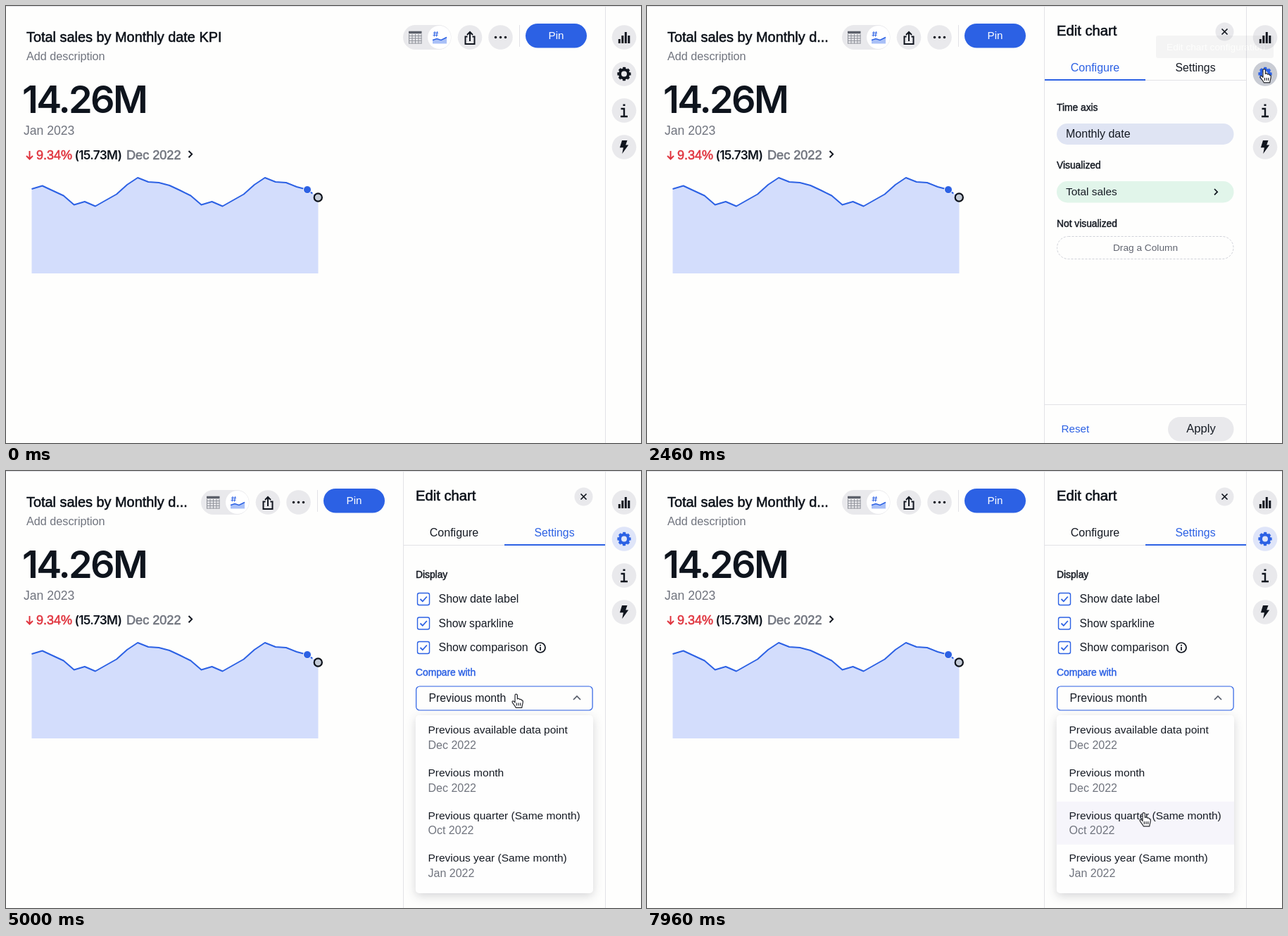
These frames come from a looping animation (902 by 621 pixels, 8000 ms). An HTML page:

```html
<!DOCTYPE html>
<html lang="en">
<head>
<meta charset="utf-8">
<title>KPI chart settings</title>
<style>
  html, body { margin: 0; width: 100%; height: 100%; overflow: hidden; background: #fefefd; }
  svg { display: block; width: 100vw; height: 100vh; }
  text { font-family: "Liberation Sans", Arial, sans-serif; font-size: 16px; fill: #151a23; }
  .mid { text-anchor: middle; }
  .med { stroke: currentColor; stroke-width: .55px; color: #0b1018; fill: currentColor; }
  .head { font-size: 13.8px; stroke: currentColor; stroke-width: .45px; color: #151a23; fill: currentColor; }
  .semi { font-family: Inter, "Liberation Sans", sans-serif; font-weight: 600; fill: #0e141d; }
  .grey { fill: #70747e; }
  .opt { font-size: 15.5px; }
  .btn { fill: #e9e9ec; }
  .line { stroke: #e2e2e6; fill: none; }
  .ink { fill: none; stroke: #10151e; stroke-width: 2; }
  .thin { stroke-width: 1.7; }
  .box { fill: #fefefd; stroke: #bcc0cb; stroke-width: 1.2; }
  .chev { fill: none; stroke: #555b68; stroke-width: 1.7; }
  .blue { fill: #2c61e4; }
  .check { fill: none; stroke: #2c61e4; stroke-width: 1.4; }
</style>
</head>
<body>
<svg viewBox="0 0 902 621" preserveAspectRatio="none">
  <defs>
    <g id="tick" class="check">
      <rect x="584.5" y="173.5" width="17" height="17" rx="2.5"/>
      <path d="M588.5 182l3.3 3.3 6-6.8" stroke-width="1.8"/>
    </g>
    <g id="swatch">
      <rect class="box" x="582.6" y="384" width="66" height="34" rx="5"/>
      <rect x="593" y="393" width="15.5" height="16" rx="3"/>
      <path class="chev" d="M622 398.5l5 5 5-5"/>
    </g>
  </defs>
  <rect width="902" height="621" fill="#fefefd"/>

  <!-- KPI card -->
  <text id="title" class="med" x="29" y="50.5" style="font-size:19.9px"></text>
  <text class="grey" x="29" y="77" style="font-size:16.2px">Add description</text>
  <text class="semi" x="23" y="152" style="font-size:54px;letter-spacing:-.05em">14.26M</text>
  <text class="grey" x="25" y="183" style="font-size:17.6px">Jan 2023</text>
  <path d="M33.5 206v11M29 213l4.5 4.5 4.5-4.5" fill="none" stroke="#e0353f" stroke-width="2"/>
  <text class="med" x="43" y="218" style="font-size:18px;color:#e0353f">9.34%</text>
  <text class="semi" x="97.5" y="218" style="font-size:17.3px;letter-spacing:-.04em">(15.73M)</text>
  <text class="med" x="171" y="218" style="font-size:18.1px;color:#70747e">Dec 2022</text>
  <path class="ink" d="M259.5 206l4.6 4.6-4.6 4.6"/>
  <path id="area" fill="#d3ddfc"/>
  <path id="spark" fill="none" stroke="#2c61e4" stroke-width="2" stroke-linejoin="round"/>
  <path d="M428 261l15 11" stroke="#2c61e4" stroke-width="2" stroke-dasharray="3 3"/>
  <circle class="blue" cx="428" cy="261" r="5.5" stroke="#fff"/>
  <circle cx="443.3" cy="272" r="5.6" fill="#c3cad6" stroke="#0c1119" stroke-width="2.2"/>

  <!-- Toolbar -->
  <g id="bar">
    <rect class="btn" x="564" y="27" width="68.5" height="35" rx="17.5"/>
    <circle cx="615.5" cy="44.5" r="16.5" fill="#fff"/>
    <path d="M572 37.5h18.5" stroke="#5d616b" stroke-width="3.5"/>
    <path d="M572 42.5h18.500m-18.5 3.500h18.500m-18.5 3.500h18.500m-18.5 3.500h18.500M572.5 40v13.500m4.500-13.500v13.500m4.500-13.500v13.500m4.500-13.500v13.500m4-13.500v13.500" fill="none" stroke="#8f929a"/>
    <path d="M609.2 36l-1 7.500m4.300-7.500l-1 7.500m-4.500-5.200h7m-7.500 3h7" fill="none" stroke="#2c61e4"/>
    <path d="M606 48.5l6-2 6 2 8-4v9h-20z" fill="#a9c0f7"/>
    <path d="M606 48.5l6-2 6 2 8-4" fill="none" stroke="#2c61e4" stroke-width="1.5"/>
    <circle class="btn" cx="659" cy="44.500" r="17.300"/>
    <path class="ink" d="M655.5 43.5h-3v10.500h13v-10.500h-3M659 50V37m-4 4l4-4 4 4"/>
    <circle class="btn" cx="702.5" cy="44.5" r="17.3"/>
    <path d="M695.5 44.5h0m7 0h0m7 0h0" stroke="#10151e" stroke-width="3.6" stroke-linecap="round"/>
    <path class="line" d="M729.5 27v31"/>
    <rect id="pin" x="738" y="25" width="87" height="34.5" rx="17.25"/>
    <text class="mid" x="781.5" y="46.5" style="font-size:15.2px;fill:#fff">Pin</text>
  </g>

  <!-- Side panel -->
  <g id="panel">
    <rect x="564" width="290" height="621" fill="#fefefd"/>
    <path class="line" d="M564.5 1v620M565 105.5h286"/>
    <text class="med" x="582" y="42" style="font-size:20.2px">Edit chart</text>
    <circle class="btn" cx="820.5" cy="36.5" r="13"/>
    <path class="ink thin" d="M816.5 32.5l8 8m0-8l-8 8"/>
    <text id="tabA" class="mid" x="636.5" y="93">Configure</text>
    <text id="tabB" class="mid" x="779" y="93" style="font-size:15.8px">Settings</text>
    <rect id="under" class="blue" y="104" width="143" height="2"/>

    <g id="configure">
      <text class="head" x="582" y="148.5">Time axis</text>
      <rect x="582" y="167" width="251.5" height="30" rx="15" fill="#dfe4f3"/>
      <text x="595" y="187">Monthly date</text>
      <text class="head" x="582" y="231">Visualized</text>
      <rect x="582" y="249" width="251.5" height="30.5" rx="15" fill="#e1f5ea"/>
      <text x="595" y="269" style="font-size:15.4px">Total sales</text>
      <path class="ink thin" d="M806 260l4.2 4.2-4.2 4.2"/>
      <text class="head" x="582" y="313.5">Not visualized</text>
      <rect x="582.5" y="327.5" width="250.5" height="32" rx="16" fill="none" stroke="#cfd1d8" stroke-dasharray="3 2"/>
      <text class="mid" x="708" y="347.5" style="font-size:13.7px;fill:#60646f">Drag a Column</text>
      <path class="line" d="M565 566.5h286"/>
      <text x="588.5" y="606" style="font-size:15.2px;fill:#2c61e4">Reset</text>
      <rect class="btn" x="740" y="584" width="93.5" height="34.5" rx="17.25"/>
      <text class="mid" x="787" y="606" style="font-size:16.5px">Apply</text>
    </g>

    <g id="settings">
      <text class="head" x="582" y="151.8">Display</text>
      <use href="#tick"/><use href="#tick" y="34.5"/><use href="#tick" y="69"/>
      <text x="614.5" y="187">Show date label</text>
      <text x="614.5" y="221.5" style="font-size:15.7px">Show sparkline</text>
      <text x="614.5" y="256">Show comparison</text>
      <circle class="ink thin" cx="759" cy="251" r="7"/>
      <path class="ink thin" d="M759 246.8v2m0 1.3v5"/>
      <text id="label" class="head" x="582" y="291.3">Compare with</text>
      <rect id="select" class="box" x="582.6" y="306" width="250.5" height="34" rx="5"/>
      <text x="600.5" y="328" style="font-size:15.8px">Previous month</text>
      <path id="chev" class="chev"/>
      <text class="head" x="582" y="369.8">Color</text>
      <use href="#swatch" fill="#45b37c"/><use href="#swatch" y="52" fill="#d9434e"/>
      <text x="662" y="405.8">Positive change color</text>
      <text x="662" y="457.8" style="font-size:16.1px">Negative change color</text>
      <text class="head" x="582" y="508.3">Max data points</text>
      <rect class="box" x="582.6" y="518.5" width="250.5" height="33.5" rx="5"/>
      <text x="600" y="541" style="font-size:16.5px">5000</text>
      <text class="grey" x="582" y="568" style="font-size:13.4px">Positive values up to 20,000</text>
    </g>

    <g id="menu">
      <rect x="581.8" y="347" width="252.2" height="253" rx="5" fill="#fefefe" style="filter:drop-shadow(0 4px 7px #1a1e2c2e)"/>
      <rect id="hover" x="581.8" width="252.2" height="61" fill="#f6f5fb"/>
      <g id="options"></g>
    </g>
  </g>

  <!-- Right rail -->
  <rect x="851" width="51" height="621" fill="#fefefd"/>
  <path class="line" d="M0 .5h902M851.5 1v620"/>
  <circle class="btn" cx="878" cy="44.5" r="17.3"/>
  <circle id="gearBg" cx="878" cy="96.5" r="17.3"/>
  <circle class="btn" cx="878" cy="148.5" r="17.3"/>
  <circle class="btn" cx="878" cy="200.5" r="17.3"/>
  <path d="M871.3 53v-6m4.500 6v-11m4.500 11v-16m4.500 16v-11" stroke="#10151e" stroke-width="3"/>
  <g id="gear" fill="none" transform="translate(878 96.5)">
    <circle r="6" stroke-width="4"/>
    <circle r="8.3" stroke-width="2.8" stroke-dasharray="3.9 2.62" transform="rotate(-14)"/>
  </g>
  <path class="ink" d="M873.5 146h4.500v11m-5 0h10M876.5 140.7h3" style="stroke-width:2.4"/>
  <path d="M875 191h7.500l-2.300 6.500h4l-9 12.500 1.700-8.800h-5z" fill="#10151e"/>

  <g id="tip">
    <rect x="723" y="42" width="167" height="32" rx="3" fill="#1c2230"/>
    <text x="738" y="62.5" style="font-size:13.7px;fill:#fff">Edit chart configuration</text>
  </g>

  <g id="pointer">
    <path id="arrow" d="M0 0v15l3.500-3.200 2.300 5.400 2.500-1.100-2.300-5.100h4.600z" fill="#16181c" stroke="#fff"/>
    <g id="hand" stroke="#25272c" stroke-width="1.2" stroke-linejoin="round">
      <path fill="#fff" d="M-2 12V1.700Q-2 .2-.4.200T1.400 1.700V7Q2 6 3.200 6.400T4.600 7.700Q5.600 7 6.500 7.500T7.600 9Q9.300 8.500 9.300 11C9.300 14 8 15.500 7.800 19.300H-.8C-1.500 17-5.500 13.500-6 11.200-6 9.300-3.800 9.300-2 12Z"/>
      <path d="M.3 12.500v4M3 12.500v4M5.700 12.500v4"/>
    </g>
  </g>
</svg>
<script>
const LOOP = 8000, BLUE = '#2c61e4', INK = '#151a23';
const $ = id => document.getElementById(id);
const set = (id, name, value) => $(id).setAttribute(name, value);
const show = (id, on) => $(id).style.display = on ? '' : 'none';
const ramp = (t, from, to) => Math.min(1, Math.max(0, (t - from) / (to - from)));
const ease = p => p * p * (3 - 2 * p);
const within = (t, ...spans) => spans.some(([from, to]) => t >= from && t < to);

// time, x, y of the pointer's hot spot
const path = [
  [260, 858, 27], [330, 798, 24], [560, 798, 24], [700, 825, 42], [960, 874.5, 76],
  [1300, 877, 89.5], [2600, 877, 89.5], [2930, 791, 91], [3830, 791, 91],
  [4260, 726.5, 296], [4560, 725, 317], [5730, 725, 317], [6160, 717, 360],
  [6530, 711, 401], [6860, 708, 432], [7360, 708, 432], [7960, 706, 485.5], [LOOP, 706, 485.5]
];

function pointerAt(t) {
  const i = Math.max(1, path.findIndex(k => k[0] > t));
  const [a, b] = [path[i - 1], path[i]];
  const p = ramp(t, a[0], b[0]);
  return [a[1] + (b[1] - a[1]) * p, a[2] + (b[2] - a[2]) * p];
}

const wave = [254, 244, 250, 251, 255, 262, 269.5, 282.5, 278, 284.5, 276, 267.5];
const values = [260, 255.5, 262.5, ...wave.slice(6), ...wave, ...wave.slice(0, 4), 257, 261];
const line = 'M' + values.map((y, i) => `${(36.5 + 15.06 * i).toFixed(1)} ${y}`).join('L');
set('spark', 'd', line);
set('area', 'd', line + 'L443.5 272V380H36.5Z');

$('options').innerHTML = [
  ['Previous available data point', 'Dec 2022'],
  ['Previous month', 'Dec 2022'],
  ['Previous quarter (Same month)', 'Oct 2022'],
  ['Previous year (Same month)', 'Jan 2022']
].map(([name, date], i) => `<text class="opt" x="599.5" y="${373.3 + 60.7 * i}">${name}</text>
  <text class="grey" x="599.5" y="${395 + 60.7 * i}">${date}</text>`).join('');

function draw(t) {
  const open = ease(ramp(t, 1980, 2230));
  set('bar', 'transform', `translate(${-287 * open})`);
  set('panel', 'transform', `translate(${287 * (1 - open)})`);
  show('panel', open > 0);
  $('title').textContent = open > .85 ? 'Total sales by Monthly d...' : 'Total sales by Monthly date KPI';
  set('pin', 'fill', within(t, [570, 695]) ? '#2451c6' : BLUE);

  const inSettings = t >= 3260, menuOpen = t >= 5000;
  show('configure', !inSettings);
  show('settings', inSettings);
  set('under', 'x', 565 + 143 * ease(ramp(t, 3330, 3630)));
  $('tabA').style.fill = t < 3400 ? BLUE : INK;
  $('tabB').style.fill = t >= 2840 ? BLUE : INK;

  $('select').style.stroke = t >= 4860 ? BLUE : t >= 4440 ? '#9399a8' : '';
  $('label').style.color = menuOpen ? BLUE : INK;
  set('chev', 'd', menuOpen ? 'M806 325l5-5 5 5' : 'M806 320l5 5 5-5');
  show('menu', menuOpen);

  set('gearBg', 'fill', t >= 3230 ? '#dfe5f9' : t >= 1760 ? '#c9ccd4' : t >= 1040 ? '#e0e1e5' : '#e9e9ec');
  set('gear', 'stroke', t >= 2000 ? BLUE : '#10151e');
  set('tip', 'opacity', ramp(t, 2455, 2605) * (1 - ramp(t, 2640, 2800)));

  const [x, y] = pointerAt(t);
  const row = Math.floor((y - 348) / 60.9);
  show('hover', row >= 0);
  set('hover', 'y', 348 + 60.9 * row);
  const hand = within(t, [570, 695], [1040, 2680], [2800, 3860], [4300, LOOP]);
  show('pointer', t >= 260);
  set('pointer', 'transform', `translate(${x} ${y})`);
  show('hand', hand);
  show('arrow', !hand);
}

const start = performance.now();
function tick() {
  draw((performance.now() - start) % LOOP);
  requestAnimationFrame(tick);
}
tick();
</script>
</body>
</html>
```
